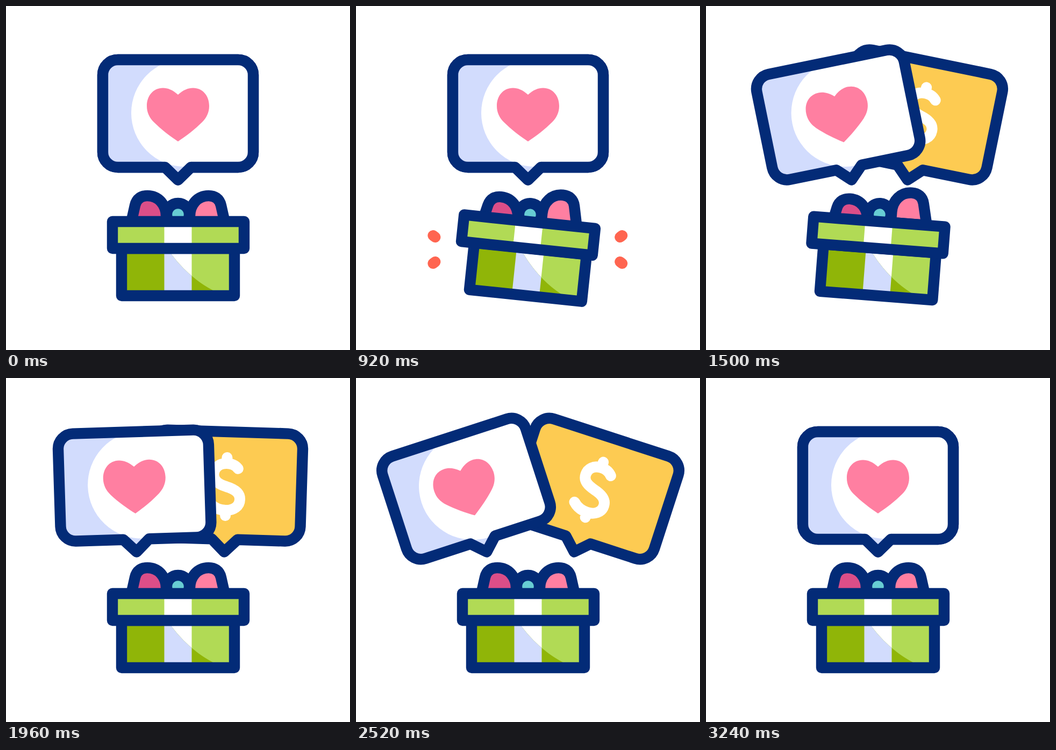
Write an HTML page that moves like this. It is 640 px wide and 640 px high and loops after 3300 ms.

```html
<!DOCTYPE html>
<html lang="en">
<head>
<meta charset="utf-8">
<title>Gift messages</title>
<style>
  html, body { margin: 0; width: 100%; height: 100%; overflow: hidden; background: #fff; }
  svg { display: block; width: 100vw; height: 100vh; }
  .line { stroke: #032b77; stroke-width: 20.4; stroke-linecap: round; stroke-linejoin: round; }
  .none { fill: none; }
  .white { fill: #fff; }
  .shade { fill: #d2dcfd; }
  .light { fill: #b1da55; }
  .dark { fill: #90b508; }
  .pink { fill: #ff7fa1; }
  .rose { fill: #dc4e88; }
  .teal { fill: #67cdd3; }
  .gold { fill: #fdcb52; }
  .dollar { fill: none; stroke: #fff; stroke-width: 20; stroke-linecap: round; stroke-linejoin: round; }
  .spark { stroke: #ff6550; stroke-width: 20; stroke-linecap: round; }
</style>
</head>
<body>
<svg viewBox="0 0 640 640">
  <defs>
    <path id="bubble" d="M208 100H432a28 28 0 0 1 28 28V272a28 28 0 0 1-28 28H344L320 323.5L296 300H208a28 28 0 0 1-28-28V128a28 28 0 0 1 28-28Z"/>
    <path id="bow" d="M231 411L240 371C243 358 252 353 263 353C284 353 298 370 298 391V411Z"/>
    <clipPath id="bubbleClip"><use href="#bubble"/></clipPath>
    <clipPath id="boxShade"><path d="M215 451H300L307 461Q341 506 385 529L400 539H215Z"/></clipPath>
  </defs>

  <g id="money">
    <use href="#bubble" class="gold line"/>
    <path class="dollar" d="M341 168C336 162 329 159 320 159C305 159 296 168 296 180C296 193 307 198 320 202C335 206 346 212 346 225C346 238 335 246 320 246C308 246 299 242 292 235M320 148V158M320 246V256"/>
  </g>

  <g id="love">
    <g clip-path="url(#bubbleClip)">
      <rect class="shade" x="170" y="90" width="300" height="250"/>
      <circle class="white" cx="333" cy="199" r="100"/>
      <rect class="white" x="333" y="90" width="140" height="250"/>
    </g>
    <use href="#bubble" class="none line"/>
    <path class="pink" d="M320 165C310 156 301 152.5 292 152.5C274 152.5 262 167 262 186C262 198 267 208 275 216C288 229 305 242 320 252C335 242 352 229 365 216C373 208 378 198 378 186C378 167 366 152.5 348 152.5C339 152.5 330 156 320 165Z"/>
  </g>

  <g id="sparks"></g>

  <g id="box">
    <rect class="light" x="215" y="451" width="210" height="88"/>
    <rect class="white" x="294.5" y="451" width="51" height="88"/>
    <g clip-path="url(#boxShade)">
      <rect class="dark" x="215" y="451" width="210" height="88"/>
      <rect class="shade" x="294.5" y="451" width="51" height="88"/>
    </g>
    <rect class="none line" x="215" y="451" width="210" height="88"/>
  </g>

  <g id="lid">
    <g id="bowLeft"><use href="#bow" class="rose line"/></g>
    <g id="bowRight"><use href="#bow" class="pink line" transform="translate(640 0) scale(-1 1)"/></g>
    <circle class="teal line" cx="320" cy="388" r="21"/>
    <rect class="light" x="198" y="401" width="245" height="50"/>
    <rect class="white" x="294.5" y="401" width="51" height="50"/>
    <rect class="none line" x="198" y="401" width="245" height="50"/>
  </g>
</svg>
<script>
const LOOP = 3300;
const el = id => document.getElementById(id);
const place = (id, value) => el(id).setAttribute('transform', value);
const clamp = v => Math.min(1, Math.max(0, v));
const smooth = u => u * u * (3 - 2 * u);

// Eased value of a track made of [time, value] pairs.
function track(keys, t) {
  if (t <= keys[0][0]) return keys[0][1];
  for (let i = 1; i < keys.length; i++) {
    const [t0, v0] = keys[i - 1], [t1, v1] = keys[i];
    if (t < t1) return v0 + (v1 - v0) * smooth((t - t0) / (t1 - t0));
  }
  return keys[keys.length - 1][1];
}

const OPEN = [[0, 0], [325, 1], [650, 0]];
const SHAKE = [[667, 0], [917, 6], [1167, -6], [1417, 6], [1667, 0]];
const BOW = [[0, 0], [417, -6], [750, 0], [1000, 10], [1250, -10], [1500, 10], [1750, 0]];
const SPREAD = [[1263, 0], [1663, 1], [2842, 1], [3245, 0]];
const SWING = [[1263, 0], [1663, 18], [2033, 0], [2520, 18], [2842, 18], [3245, 0]];

const sparks = [[-1, -1], [-1, 1], [1, -1], [1, 1]].map(([sx, sy]) => {
  const line = document.createElementNS('http://www.w3.org/2000/svg', 'path');
  line.setAttribute('class', 'spark');
  line.setAttribute('d', `M${-2 * sx} ${-1.5 * sy}L${2 * sx} ${1.5 * sy}`);
  el('sparks').append(line);
  return { line, sx, sy };
});

function drawSparks(t) {
  const out = 1 - (1 - clamp((t - 380) / 570)) ** 2;
  const size = smooth(clamp((t - 380) / 140)) * (1 - smooth(clamp((t - 950) / 170)));
  for (const { line, sx, sy } of sparks) {
    const x = 319.3 + sx * (141 + 33 * out), y = 453 + sy * 24.5 * out;
    line.setAttribute('transform', `translate(${x} ${y}) scale(${size})`);
    line.style.display = size > 0.01 ? '' : 'none';
  }
}

function draw(t) {
  const open = track(OPEN, t), shake = track(SHAKE, t), bow = track(BOW, t);
  const spread = track(SPREAD, t), swing = track(SWING, t);
  place('love', `translate(${-77 * spread} 0) rotate(${-swing} 320 323)`);
  place('money', `translate(${86 * spread} 0) rotate(${swing} 320 323)`);
  place('box', `translate(0 ${59 * open}) rotate(${shake} 320 495)`);
  place('lid', `translate(0 ${-34 * open}) rotate(${shake + 22 * open} 320 426)`);
  place('bowLeft', `translate(0 ${bow})`);
  place('bowRight', `translate(0 ${-bow})`);
  drawSparks(t);
}

const start = performance.now();
function frame() {
  draw((performance.now() - start) % LOOP);
  requestAnimationFrame(frame);
}
frame();
</script>
</body>
</html>
```
